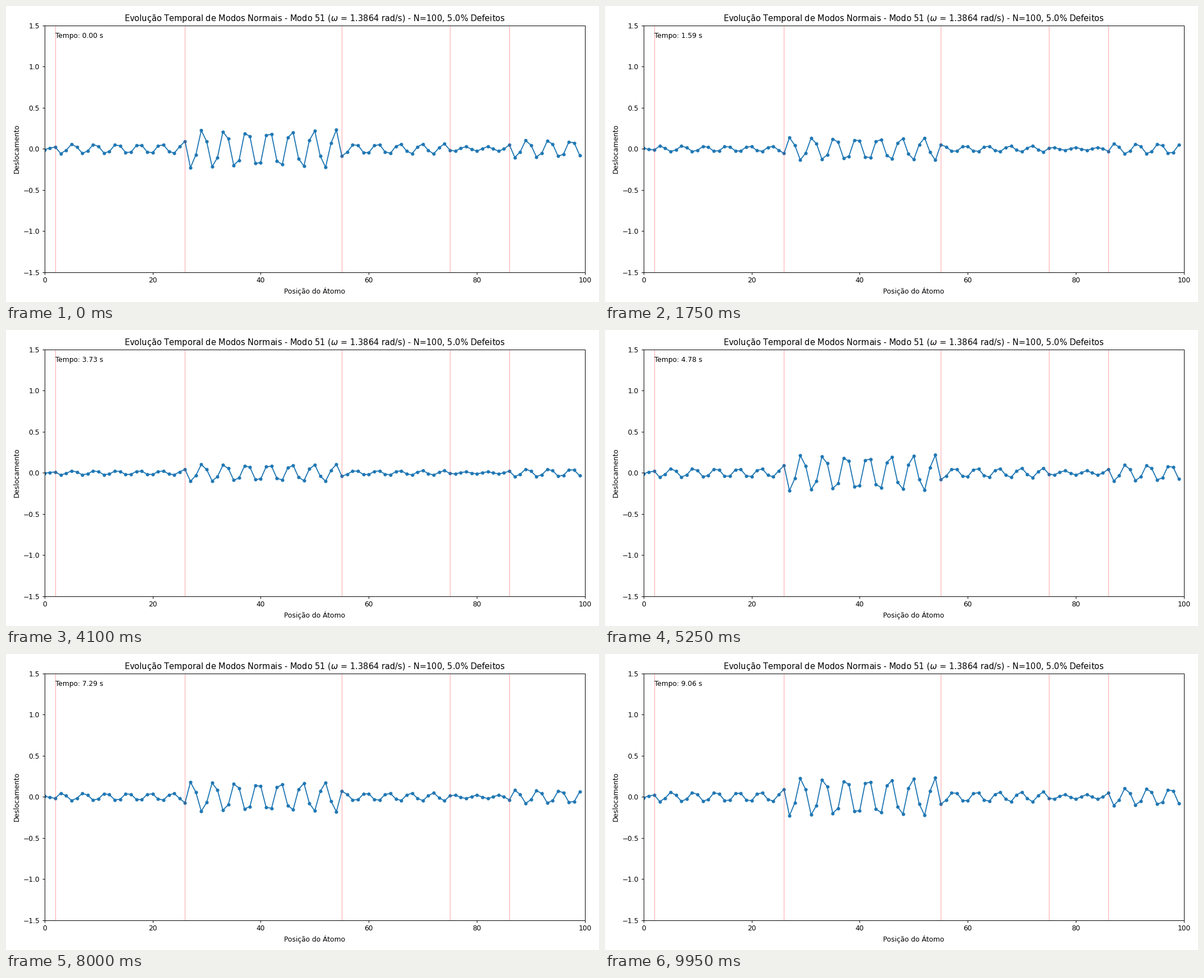
A matplotlib script for the animation above (10 s loop, 1058 by 529 pixels).

```python
import numpy as np
import matplotlib.pyplot as plt
from matplotlib.animation import FuncAnimation

N = 100
FRAMES = 200
OMEGA = 1.3864
DEFECTS = [2, 26, 55, 75, 86]
DEFECT_MASS = 3.0
LAYOUT_DPI = 100
STAGE_DPI = 1058 / 12


def normal_mode(omega):
    """Mass-weighted mode of a free-ended chain, closest to omega."""
    mass = np.ones(N)
    mass[DEFECTS] = DEFECT_MASS
    stiff = 2 * np.eye(N) - np.eye(N, k=1) - np.eye(N, k=-1)
    stiff[0, 0] = stiff[-1, -1] = 1
    vals, vecs = np.linalg.eigh(stiff / np.sqrt(np.outer(mass, mass)))
    freqs = np.sqrt(np.clip(vals, 0, None))
    mode = vecs[:, np.argmin(abs(freqs - omega))]
    return mode * np.sign(mode[29])


mode = normal_mode(OMEGA)
times = np.linspace(0, 4 * np.pi / OMEGA, FRAMES)

plt.rcParams["font.family"] = "DejaVu Sans"
fig, ax = plt.subplots(figsize=(12, 6), dpi=LAYOUT_DPI)
line, = ax.plot(np.arange(N), mode, "o-", color="#1f77b4", lw=1.5, markersize=4)
for pos in DEFECTS:
    ax.axvline(pos, color="red", alpha=0.3, lw=1)
label = ax.text(0.02, 0.95, "", transform=ax.transAxes)

ax.set_xlim(0, N)
ax.set_ylim(-1.5, 1.5)
ax.set_xlabel("Posição do Átomo")
ax.set_ylabel("Deslocamento")
title = ax.set_title(
    rf"Evolução Temporal de Modos Normais - Modo 51 ($\omega$ = {OMEGA:.4f} rad/s)"
    f" - N={N}, {100 * len(DEFECTS) / N:.1f}% Defeitos")

# Margins are laid out at the round dpi, then the figure takes the stage size.
fig.tight_layout()
fig.set_dpi(STAGE_DPI)
fig.set_size_inches(12, 6)
title.set_fontsize(11.93)


def update(i):
    line.set_ydata(mode * np.cos(OMEGA * times[i]))
    label.set_text(f"Tempo: {times[i]:.2f} s")
    return line, label


anim = FuncAnimation(fig, update, frames=FRAMES, interval=50, repeat=True, repeat_delay=0)
plt.show()
```
